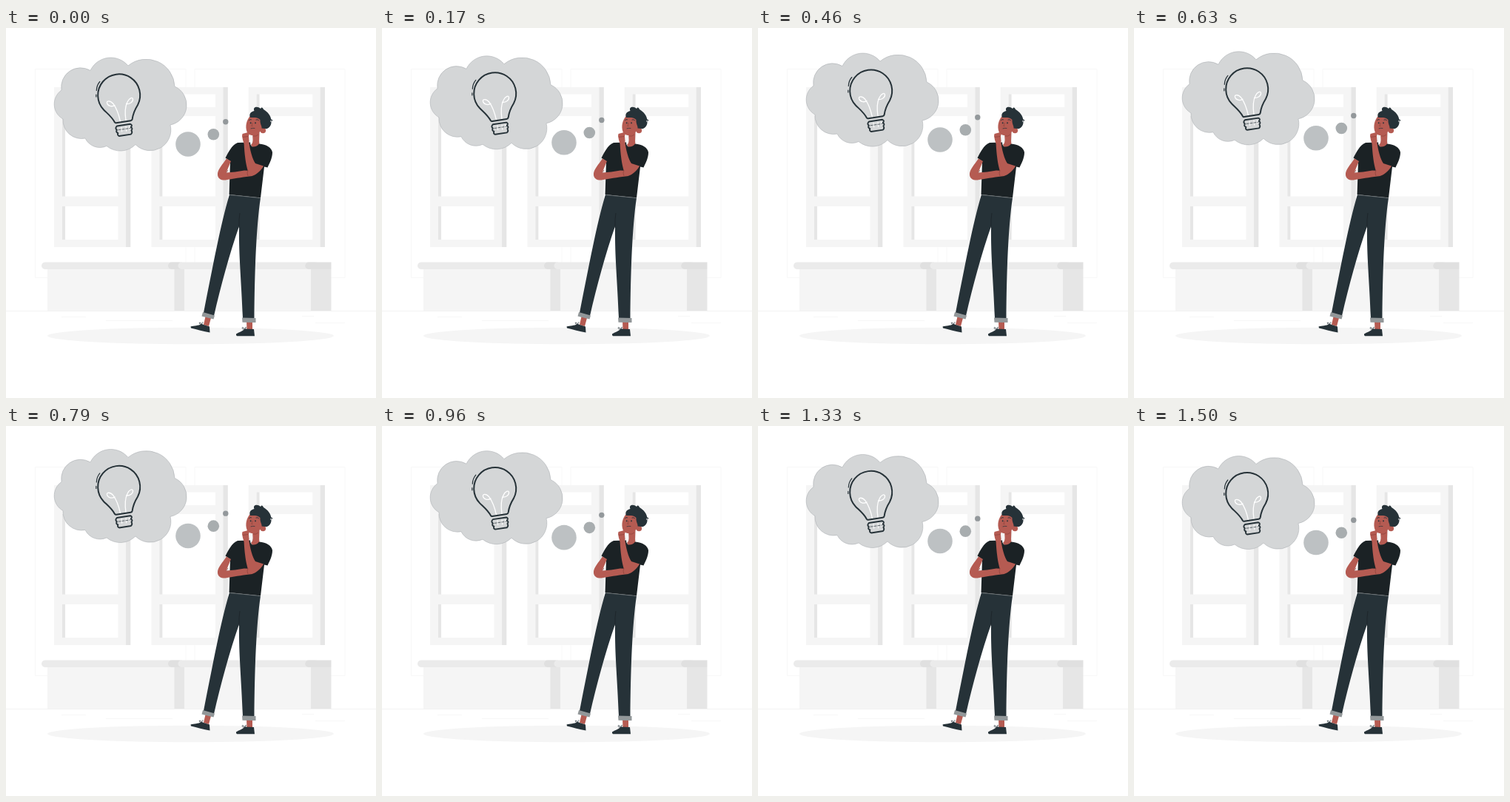
An HTML page that plays this animation: 500x500 px, repeating every 1.54 s.

```html
<!DOCTYPE html>
<html lang="en">
<head>
<meta charset="utf-8">
<title>Thinking</title>
<style>
  html, body { margin: 0; width: 100%; height: 100%; overflow: hidden; background: #fff; }
  svg { display: block; width: 100vw; height: 100vh; }
</style>
</head>
<body>
<svg viewBox="0 0 500 500">
  <defs>
    <g id="window">
      <path fill="#f5f5f5" d="M0 80H98V296H0Z"/>
      <path fill="#e6e6e6" d="M97 80h6.300V296h-6.300Z"/>
      <path fill="#e6e6e6" d="M11 89.500h4V107h-4ZM11 119h4V227.500h-4ZM11 241h4V286h-4Z"/>
      <path fill="#fff" d="M15 89.500H86.500V107H15ZM15 119H86.500V227.500H15ZM15 241H86.500V286H15Z"/>
    </g>
  </defs>

  <g id="room">
    <path fill="none" stroke="#f8f8f8" d="M39.500 55.500H243V337.500H39.500ZM255 55.500H458V337.500H255Z"/>
    <use href="#window" x="65"/>
    <use href="#window" x="196.500"/>
    <use href="#window" x="327.700"/>
    <path fill="#f5f5f5" d="M56 326H228V382H56ZM241 326H412V382H241Z"/>
    <path fill="#e6e6e6" d="M227.500 326H241V382H227.500ZM412 326H439.500V382H412Z"/>
    <rect x="48" y="316.500" width="190" height="9.500" rx="4.700" fill="#ebebeb"/>
    <rect x="219" y="316.500" width="22" height="9.500" rx="4.700" fill="#e0e0e0"/>
    <rect x="232.500" y="316.500" width="190" height="9.500" rx="4.700" fill="#ebebeb"/>
    <path fill="#e0e0e0" d="M409 316.500H439.500V326H409a4.700 4.700 0 0 1 0-9.500Z"/>
    <path stroke="#f2f2f2" d="M0 382.500H500"/>
    <path stroke="#f7f7f7" d="M135 395.500H225M75 390.500H108M400 389.500H416M418 398.500H458"/>
    <ellipse cx="249.500" cy="416" rx="193.500" ry="11.300" fill="#f5f5f5"/>
  </g>

  <g id="thought">
    <circle cx="296.800" cy="126.700" r="3.700" fill="#93989b"/>
    <circle cx="280.300" cy="143.700" r="7.800" fill="#a8adaf"/>
    <circle cx="246" cy="157" r="16.800" fill="#bdc1c3"/>
    <path fill="#d4d6d7" stroke="#a3a7aa" stroke-width=".5" d="M75 84A26 26 0 0 1 114 57.500A30.500 30.500 0 0 1 165 51A38.500 38.500 0 0 1 228 79A27.500 27.500 0 0 1 222 131A28 28 0 0 1 175 157.500A29 29 0 0 1 136 159.500A22 22 0 0 1 107 149A25 25 0 0 1 77 123A23 23 0 0 1 75 84Z"/>
    <g fill="none" stroke-linecap="round" stroke-linejoin="round">
      <g stroke="#fff" stroke-width="1.300">
        <path d="M154.500 126.500C152 115 149 108 145 102.500C141 97.500 135.500 98 136.500 101.500C137.500 105.500 143 107 147 104.500"/>
        <path d="M162 125C160.500 115 160.500 107 164 100C166.500 94.500 171 93 171.500 96C172 100 167 103 162.500 102.500"/>
        <path d="M156 134l.7 6M162 133l.7 6.500M166.500 133l.3 4" stroke-width="1"/>
      </g>
      <g stroke="#263238" stroke-width="2">
        <path d="M147 127.500C143 120 137 115.500 132 110.500A28.500 28.500 0 1 1 178 104C173 112 171.500 117 170.700 123Q170.300 125 168.500 125.300L149 128.300Q147.700 128.500 147 127.500Z"/>
        <path d="M150 132.500L168 129.800q3.500 1.500.8 4.200q3 1.800.6 4.400q2 3-.6 5.200L153 146q-3-1-1.600-4q-3.400-1-1.600-4.200q-3-2.400.2-5.300Z" stroke-width="1.900"/>
        <path d="M152 137.700l16-2.300" stroke-width=".7" stroke-dasharray="3 2"/>
        <path d="M122.300 84.500Q122.500 77.500 126.800 72.500M121.800 90v3" stroke-width="1.200"/>
      </g>
    </g>
  </g>

  <g id="man">
    <g fill="#b55b52">
      <path d="M269.500 390L277 392L274 403L267 401ZM325 396H333V408H325.500Z"/>
      <path d="M333 142L342.500 140L342 153Q343 158 341 160Q334 164 331 158Q334 155 333.500 150Z"/>
      <path d="M330 119C325 124 323 133 325.500 140C327 145 334 146 338 144L346 138L346 124L337 118Z"/>
      <circle cx="347.300" cy="138.500" r="3.800"/>
    </g>
    <g fill="#263238">
      <path d="M249.500 403.500C254 402 260 402.500 264 400L275 403.500L275.500 411.500C267 410 258 407.500 250 405.500Z"/>
      <path d="M311 413.500C315 411 319 410 323 406.500L335 407L336 416.300H312Q310.500 415 311 413.500Z"/>
      <path d="M302 225L344 229.500C338 270 336 330 335.500 392.500L320 392C318 340 314.500 310 315 268C302 305 290 350 281 389L267 385C280 320 290 265 302 225Z"/>
    </g>
    <path fill="none" stroke="#263238" stroke-width=".7" d="M265 401q-5-1-3.500-3q2 0 3.500 3q-.5-4 1.500-3M323 407.500q-5-.5-3.500-3q2 .3 3.500 3q0-4 2-3"/>
    <path fill="#929799" d="M266 384L282 388.500L280.500 393.500L264.500 389.500ZM319 391.500L337.500 392V398L319.500 397.800Z"/>
    <path fill="none" stroke="#1a2226" stroke-width=".7" d="M316 250Q314.500 258 315 270"/>
    <path fill="#1b2225" d="M313 155C305 158 300 169 296.500 175.500L303 180L301.500 225L344 229.500L349 187.500L353.500 188.500C356 183 360 176 360 168C359 162 352 157 342 156.500Q339 161 333 160.500Q330 159 330 154.500Z"/>
    <path stroke="#8c9193" stroke-width=".6" d="M302 225.500L344 229.700"/>
    <g fill="#b55b52">
      <path d="M298 176.500C293 184 285 192 286 199C287 205 293 206.500 299 205C312 203 322 201 333 200L334 193L322 192.500C314 194 305 195 297.500 195.500L304 180Z"/>
      <path d="M321.500 153L328 151C329.500 165 333 177 337 183L348 186.500C344 194 336 200 331 200C325 196 322 170 321.500 153Z"/>
      <path d="M319.500 143L327 141Q329.500 143 328 146L328.500 153L321.500 156Q319.500 150 319 146Z"/>
    </g>
    <path fill="#263238" d="M335.500 112C333 106.500 340 105 344 109C345 106.500 347 107 348 110C353 113 358.500 118 358.500 126C359 132 355 137 350 136L345.500 135.500C346 132 343 130 343.500 124C340 120 334 121 330 121C328 116 331 113 335.500 112ZM357 127L360.500 125L358.500 123Z"/>
    <g fill="none" stroke="#263238" stroke-linecap="round">
      <path d="M328.500 124.500q1.500-1.500 3-.8M338 124q2-1 3.500.7" stroke-width=".9"/>
      <path d="M330.700 128v.5M337 128v.5" stroke-width="1.700"/>
      <path d="M331 135.800q2.500-.8 5-.3" stroke-width=".7"/>
    </g>
    <path fill="none" stroke="#8c423b" stroke-width=".7" d="M333.500 128L331.800 132.500H333.500M320 147.500L327 146.500M334 146Q338 147 341 144M327 192Q325 196 327 200M297.500 195.500L300 192"/>
  </g>
</svg>
<script>
  const LOOP = 1540, RISE = 10, LEAD = 45;
  const thought = document.getElementById('thought');
  const lift = ms => RISE * (1 - Math.abs(((ms + LEAD) % LOOP) / (LOOP / 2) - 1));
  const start = performance.now();

  function draw(now) {
    const dy = lift(0) - lift(Math.max(0, now - start));
    thought.setAttribute('transform', `translate(0 ${dy.toFixed(3)})`);
    requestAnimationFrame(draw);
  }
  draw(start);
</script>
</body>
</html>
```
